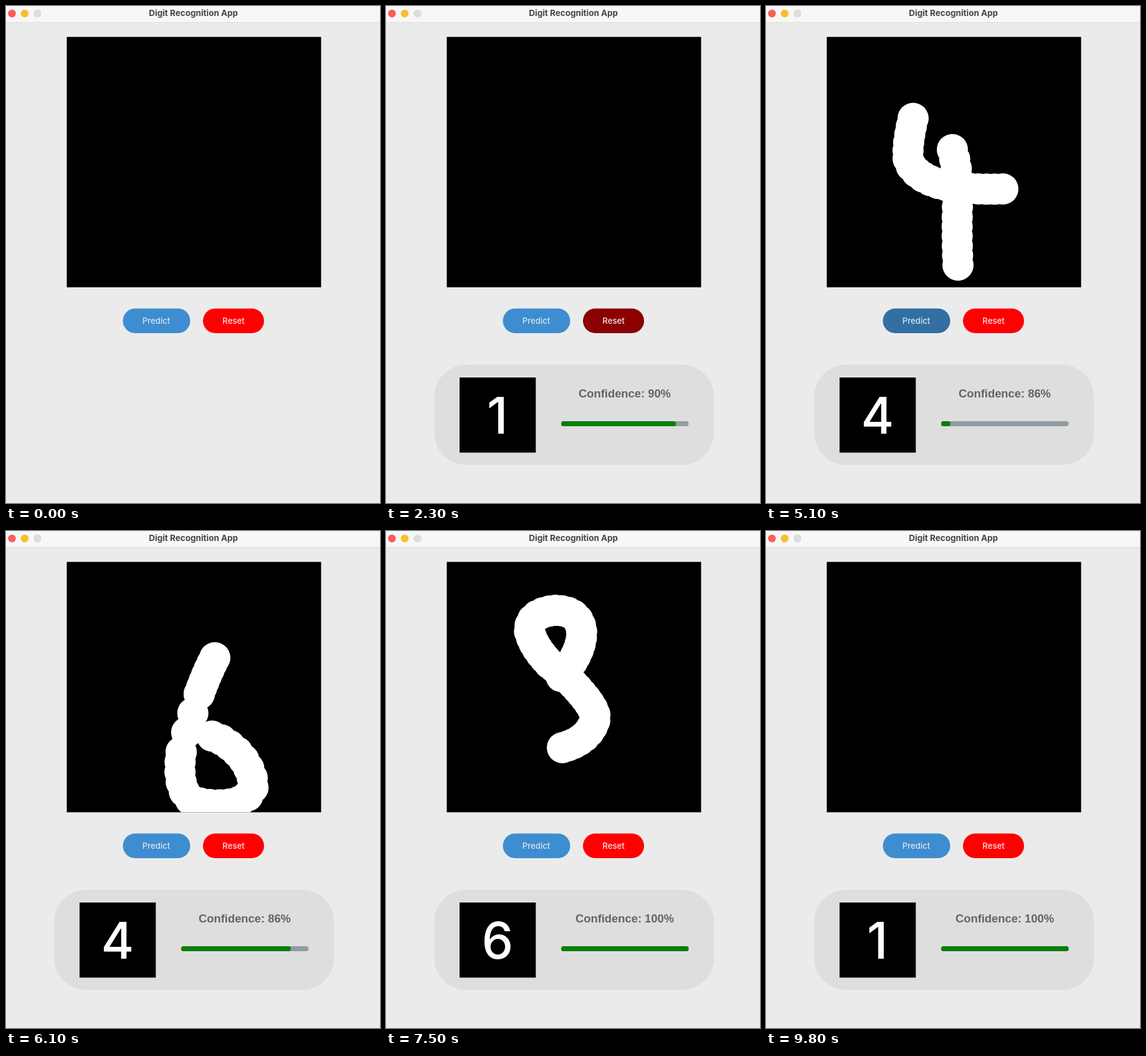
Write an HTML page that moves like this. It is 600 by 796 pixels and loops after 9900 ms.

```html
<!DOCTYPE html>
<html lang="en">
<head>
<meta charset="utf-8">
<title>Digit Recognition App</title>
<style>
html, body { margin: 0; width: 100%; height: 100%; overflow: hidden; background: #ebebeb; }
svg { display: block; width: 600px; height: 796px; }
text { font-family: Inter, Roboto, sans-serif; text-anchor: middle; }
.label { font-size: 13.2px; font-weight: 500; fill: #dce4ee; }
#strokes path { fill: none; stroke: #fff; stroke-width: 50; stroke-linecap: round; stroke-linejoin: round; }
</style>
</head>
<body>
<svg viewBox="0 0 600 796">
  <defs><clipPath id="pad"><rect x="97.5" y="49.5" width="408" height="401"/></clipPath></defs>
  <rect width="600" height="796" fill="#ebebeb"/>
  <rect width="600" height="26" fill="#f7f7f7"/>
  <rect y="26" width="600" height="1" fill="#dcdcdc"/>
  <circle cx="9.5" cy="12" r="6.2" fill="#f95e57"/>
  <circle cx="30" cy="12" r="6.2" fill="#fbbc2f"/>
  <circle cx="50.5" cy="12" r="5.9" fill="#dddddd" stroke="#d0d0d0" stroke-width=".6"/>
  <text x="300.7" y="16.3" font-size="13.5" font-weight="700" fill="#454545">Digit Recognition App</text>
  <rect x="97.5" y="49.5" width="408" height="401"/>
  <g id="strokes" clip-path="url(#pad)"></g>
  <rect id="predict" x="187.5" y="484.5" width="108" height="39.5" rx="19.7"/>
  <text class="label" x="241" y="509.2">Predict</text>
  <rect id="reset" x="316" y="484.5" width="98" height="39.5" rx="19.7"/>
  <text class="label" x="365" y="509.2" style="fill:#f4e6ea">Reset</text>
  <g id="panel">
    <rect x="77.5" y="574.5" width="448.5" height="160.5" rx="51" fill="#dedede"/>
    <rect x="118" y="595" width="122.3" height="120.3"/>
    <text id="digit" x="178.8" y="685.3" font-size="80.5" font-weight="450" fill="#fff"></text>
    <text id="score" x="383" y="626.8" fill="#646464"
      style="font:700 18.35px 'Liberation Sans', Arial, sans-serif"></text>
    <rect x="281" y="665" width="204.5" height="8" rx="4" fill="#939ba2"/>
    <rect id="bar" x="281" y="665" height="8" rx="3.5" fill="#088008"/>
  </g>
</svg>
<script>
const LOOP = 9900, STEP = 100, BAR_WIDTH = 204.5, BAR_RATE = 0.12;
const byId = id => document.getElementById(id);

// Pen strokes: path, start, end and wipe times, rough distance between dabs
const strokes = [
  { d: "M298 216 Q296 300 298 390", start: 520, end: 850, wipe: 2080, gap: 12 },
  { d: "M149 187 Q160 182 172 182 L205 182 Q226 184 242 188 C260 193 264 203 263 212 Q262 222 243 266 Q226 302 222 320 Q223 332 250 335 Q280 338 300 339 L310 341",
    start: 2520, end: 2900, wipe: 3850, gap: 10 },
  { d: "M236 180 C230 206 227 224 228 246 Q238 275 286 287 Q330 295 380 293", start: 4380, end: 4690, wipe: 5620, gap: 13 },
  { d: "M299 230 C308 262 308 290 307 325 Q306 375 308 415", start: 4740, end: 4900, wipe: 5620, gap: 15 },
  { d: "M335 203 Q322 228 310 261", start: 5740, end: 5800, wipe: 6960, gap: 11 },
  { d: "M310 261 L299 294 L292 315 L281 354", start: 5800, end: 5840, wipe: 6960, gap: 33 },
  { d: "M281 354 C278 375 276 408 293 428 C310 441 362 443 382 429 Q401 415 396 399 Q388 365 358 343 Q338 327 315 326",
    start: 5840, end: 6080, wipe: 6960, gap: 16 },
  { d: "M281 233 Q314 195 314 163 Q312 128 273 127 Q230 130 230 160 Q236 185 262 212 Q290 234 303 248 Q336 283 336 300 Q327 335 283 347",
    start: 7120, end: 7490, wipe: 8500, gap: 10 },
  { d: "M283 347 C245 347 248 300 267 270 Q280 250 300 215", start: 7500, end: 7690, wipe: 8500, gap: 10 },
  { d: "M236 168 Q232 280 235 385", start: 8650, end: 8820, wipe: 9600, gap: 14 }
];

const results = [
  { at: 1190, digit: 1, score: 90 },
  { at: 3117, digit: 2, score: 98 },
  { at: 5040, digit: 4, score: 86 },
  { at: 6520, digit: 6, score: 100 },
  { at: 7900, digit: 8, score: 88 },
  { at: 8950, digit: 1, score: 100 }
];

const predictHover = [[1050, 1550], [2950, 3350], [4950, 5300], [6400, 6700], [7800, 8150], [8870, 9150]];
const resetHover = [[1850, 2450], [3550, 4050], [5450, 5700], [6850, 7050], [8400, 8600], [9500, 9750]];

for (const s of strokes) {
  s.path = document.createElementNS("http://www.w3.org/2000/svg", "path");
  s.path.setAttribute("d", s.d);
  byId("strokes").append(s.path);
  // Space the dabs evenly so that the last one sits just inside the end
  const length = s.path.getTotalLength() - 0.1;
  s.steps = Math.round(length / s.gap);
  s.gap = length / s.steps;
}

const within = (spans, t) => spans.some(([a, b]) => t >= a && t < b);

function drawStroke(s, t) {
  const shown = t >= s.start && t < s.wipe;
  s.path.style.display = shown ? "" : "none";
  if (!shown) return;
  const part = Math.min(1, (t - s.start) / (s.end - s.start));
  const done = Math.round(part * s.steps);
  s.path.setAttribute("stroke-dasharray", `0 ${s.gap} `.repeat(done) + "0 9999");
}

function render(t) {
  strokes.forEach(s => drawStroke(s, t));
  byId("predict").setAttribute("fill", within(predictHover, t) ? "#326fa2" : "#3d8dd0");
  byId("reset").setAttribute("fill", within(resetHover, t) ? "#8b0000" : "#ff0000");
  const result = results.filter(r => t >= r.at).pop();
  byId("panel").style.display = result ? "" : "none";
  if (!result) return;
  byId("digit").textContent = result.digit;
  byId("score").textContent = `Confidence: ${result.score}%`;
  const level = Math.min(result.score, (t - result.at) * BAR_RATE) / 100;
  byId("bar").setAttribute("width", Math.max(8, level * BAR_WIDTH));
}

const origin = performance.now();
function tick() {
  const t = (performance.now() - origin) % LOOP;
  render(Math.floor(t / STEP) * STEP);
  requestAnimationFrame(tick);
}
tick();
</script>
</body>
</html>
```
